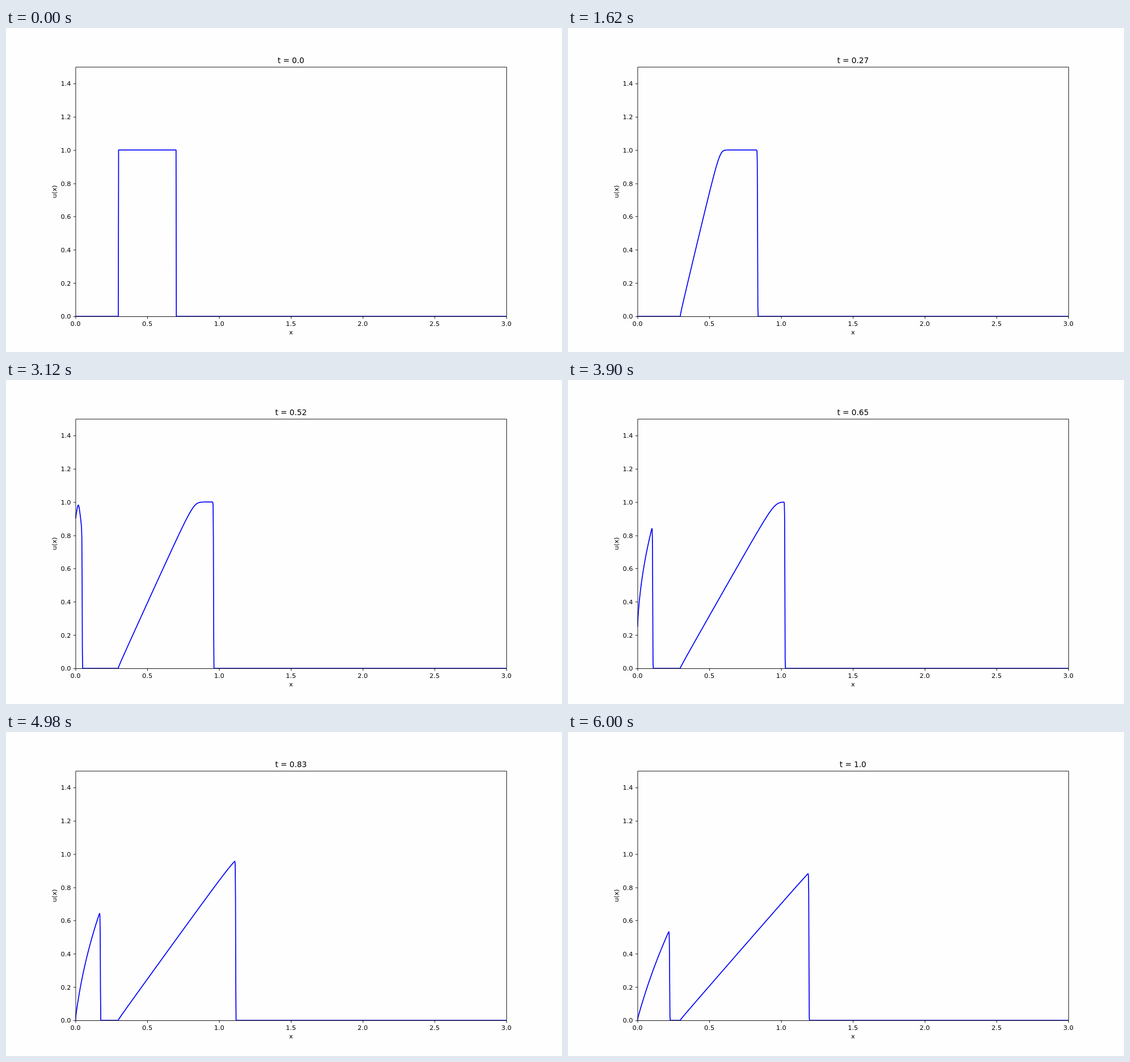
Recreate the animation shown at these times as an HTML page. Size 980 by 572 pixels, loop 6060 ms.

```html
<!DOCTYPE html>
<html lang="en">
<head>
<meta charset="utf-8">
<title>Nonlinear wave</title>
<style>
  html, body { margin: 0; width: 100%; height: 100%; overflow: hidden; background: #fefefe; }
  svg { display: block; width: 100%; height: 100%; }
  text { font: 13.89px "DejaVu Sans", sans-serif; text-anchor: middle; }
  #title { font-size: 16.67px; }
  #yTicks text { text-anchor: end; }
  #axes { fill: none; stroke: #000; stroke-width: 1.11; }
  #wave { fill: none; stroke: #00f; stroke-width: 2.083; stroke-linejoin: round; }
</style>
</head>
<body>
<svg viewBox="0 0 1200 700" preserveAspectRatio="none">
  <clipPath id="plot"><rect x="150" y="84" width="930" height="539"/></clipPath>
  <g clip-path="url(#plot)"><polyline id="wave"/></g>
  <path id="axes"/>
  <g id="xTicks"></g>
  <g id="yTicks"></g>
  <text id="title" x="615" y="75.8"></text>
  <text x="615" y="662.5">x</text>
  <text transform="translate(109.5 353.5) rotate(-90)">u(x)</text>
</svg>
<script>
const FRAMES = 101, FRAME_MS = 60;
const DX = 0.002, DT = 0.001, CELLS = 1501, STEPS_PER_FRAME = 10;
const byId = id => document.getElementById(id);
const px = x => 150 + 310 * x;
const py = u => 623 - u * 539 / 1.5;
const snap = v => Math.floor(v + 0.5) + 0.5;

function addLabel(group, x, y, value) {
  const label = document.createElementNS("http://www.w3.org/2000/svg", "text");
  label.setAttribute("x", x);
  label.setAttribute("y", y);
  label.textContent = value.toFixed(1);
  byId(group).append(label);
}

function drawAxes() {
  let path = "M150.5 84.5H1080.5V623.5H150.5Z";
  for (let i = 0; i <= 6; i++) {
    path += `M${snap(px(i / 2))} 623.5v4.86`;
    addLabel("xTicks", px(i / 2), 643.3, i / 2);
  }
  for (let i = 0; i <= 7; i++) {
    path += `M150.5 ${snap(py(i / 5))}h-4.86`;
    addLabel("yTicks", 140.3, py(i / 5) + 5.3, i / 5);
  }
  byId("axes").setAttribute("d", path);
}

// Triangular pulse entering at x = 0
const inflow = t => Math.max(0, 1 - Math.abs(t - 0.5) / 0.2);

// Burgers' equation, conservative upwind scheme
function solve() {
  const u = Float64Array.from({ length: CELLS }, (_, i) => +(i >= 150 && i <= 350));
  const curves = [];
  for (let step = 0; step <= (FRAMES - 1) * STEPS_PER_FRAME; step++) {
    if (step) {
      for (let i = CELLS - 1; i > 0; i--) {
        u[i] -= DT / DX * (u[i] * u[i] - u[i - 1] * u[i - 1]) / 2;
        if (u[i] < 1e-12) u[i] = 0;
      }
      u[0] = inflow(step * DT);
    }
    if (step % STEPS_PER_FRAME === 0) {
      curves.push(Array.from(u, (v, i) => px(i * DX).toFixed(2) + "," + py(v).toFixed(2)).join(" "));
    }
  }
  return curves;
}

function timeLabel(frame) {
  const t = frame / 100;
  return "t = " + (Number.isInteger(t) ? t.toFixed(1) : t);
}

drawAxes();
const curves = solve();
const start = performance.now();
let shown = -1;

function render(now) {
  const frame = Math.floor(Math.max(0, now - start) / FRAME_MS) % FRAMES;
  if (frame !== shown) {
    shown = frame;
    byId("wave").setAttribute("points", curves[frame]);
    byId("title").textContent = timeLabel(frame);
  }
  requestAnimationFrame(render);
}
render(start);
</script>
</body>
</html>
```
